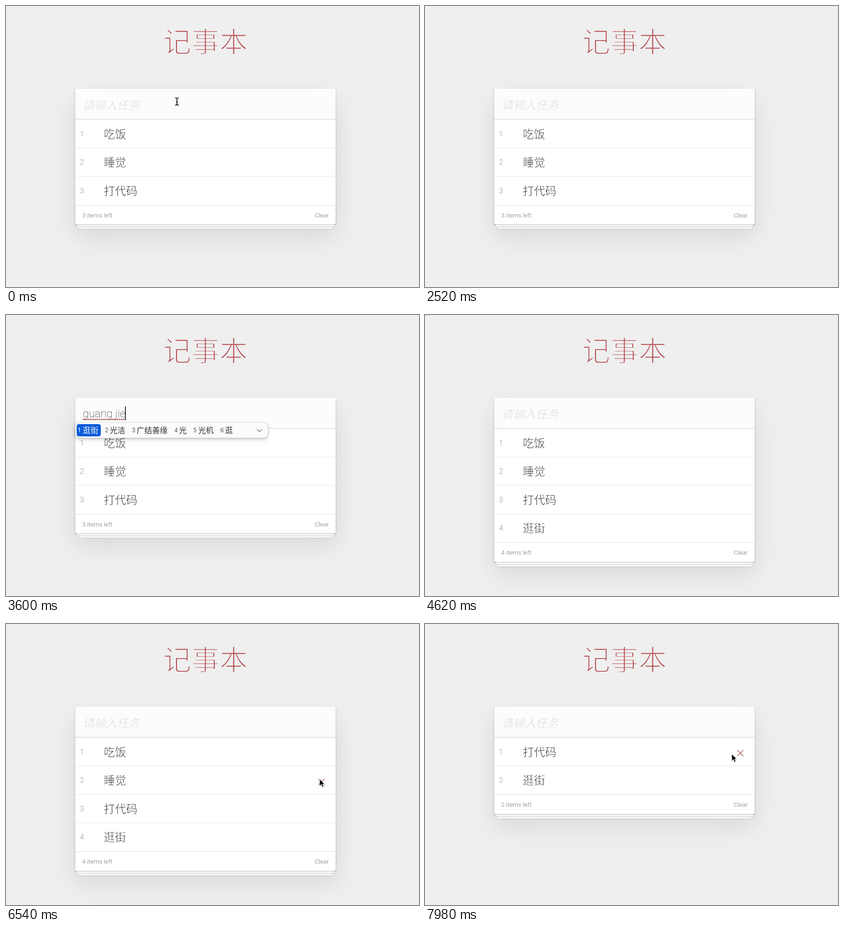
These frames come from a looping animation (906 px wide and 618 px high, 8000 ms). An HTML page:

```html
<!DOCTYPE html>
<html lang="zh-CN">
<head>
<meta charset="utf-8">
<style>
  html, body { margin: 0; width: 100%; height: 100%; overflow: hidden; background: #efefef; }
  body { position: relative; font-family: Roboto, "Noto Sans CJK SC", sans-serif; font-weight: 100; color: #444; }
  body * { position: absolute; box-sizing: border-box; white-space: nowrap; }
  .cjk { font-family: "Noto Sans CJK SC", "Noto Sans CJK", sans-serif; }
  /* An outline in the background colour thins the glyphs. */
  h1 { margin: 0; left: 0; width: 875px; top: 29.5px; line-height: 90px; text-align: center; font-size: 62px; font-weight: 100;
    color: #b5484c; -webkit-text-stroke: 2.7px #efefef; }
  #card { left: 152px; top: 182px; width: 571px; background: #fff;
    box-shadow: 0 2px 4px rgba(0,0,0,.2), 0 26px 52px rgba(0,0,0,.1); }
  #entry { left: 0; top: 0; width: 571px; height: 68.4px; background: #fcfcfc;
    box-shadow: inset 0 -2px 1px rgba(0,0,0,.03); border-bottom: 1px solid #d8d8d8; }
  #hint { left: 16.5px; top: 13.5px; line-height: 40px; font-size: 24.9px; font-style: italic; color: #dcdcdc;
    -webkit-text-stroke: .6px #fcfcfc; }
  #typed { left: 16.5px; top: 15px; line-height: 40px; font-size: 24px; color: #222; white-space: pre; }
  #typed.cjk { top: 13.5px; color: #444; -webkit-text-stroke: .6px #fcfcfc; }
  #typed.pinyin { border-bottom: 1px solid #777; height: 33.5px; }
  #typed.pinyin::after { content: ""; position: absolute; left: 0; right: 0; bottom: 0; border-bottom: 2px dotted #e0403c; }
  #caret { top: 19px; width: 1.4px; height: 30px; background: #333; }
  #list { left: 0; top: 68.4px; }
  .row { left: 0; width: 571px; height: 62.4px; border-bottom: 1px solid #e8e8e8; }
  .row:last-child { border-bottom: 0; }
  .num { left: 10px; top: 11.5px; line-height: 40px; font-size: 16.5px; font-weight: 300; color: #999; }
  .label { left: 62.5px; top: 9.5px; line-height: 40px; font-size: 24.6px; -webkit-text-stroke: .6px #fff; }
  .row svg { left: 532px; top: 26px; }
  #foot { left: 0; width: 571px; height: 42.5px; background: #fff; border-top: 1px solid #dedede;
    font-size: 13.6px; font-weight: 300; line-height: 42px; color: #777;
    box-shadow: 0 1px 1px rgba(0,0,0,.2), 0 8.3px 0 -3.1px #f6f6f6, 0 9.3px 1px -3.1px rgba(0,0,0,.2),
      0 16.6px 0 -6.2px #f6f6f6, 0 17.6px 2px -6.2px rgba(0,0,0,.2); }
  #count { left: 15px; top: 0; }
  #clear { right: 15px; top: 0; }
  #ime { left: 152px; top: 237px; width: 422px; height: 33px; border-radius: 8px; background: #fbfbfb;
    box-shadow: 0 0 1px rgba(0,0,0,.5), 0 3px 9px rgba(0,0,0,.25); }
  .pick { top: 3px; height: 27px; line-height: 26px; border-radius: 5px; font-size: 17px; font-weight: 500; color: #333; }
  .pick b { left: 3px; top: 1px; font: 400 12.5px/26px Inter, sans-serif; color: #555; }
  .pick span { left: 13.4px; top: 0; }
  .pick.on { background: #0a5bd8; }
  .pick.on, .pick.on b { color: #fff; }
  #ime svg { left: 397px; top: 13px; }
  .pointer { left: 0; top: 0; overflow: visible; filter: drop-shadow(0 1px 1px rgba(0,0,0,.3)); }
</style>
</head>
<body>
<h1 class="cjk">记事本</h1>
<div id="card">
  <div id="entry">
    <div id="hint" class="cjk">请输入任务</div>
    <div id="typed"></div>
    <div id="caret"></div>
  </div>
  <div id="list"></div>
  <div id="foot"><span id="count"></span><span id="clear">Clear</span></div>
</div>
<div id="ime"></div>
<svg id="arrow" class="pointer" width="14" height="20"><path d="M0 0V15.2L3.6 11.9L6 17.6L8.8 16.4L6.4 10.9H11Z" fill="#000" stroke="#fff" stroke-width="1"/></svg>
<svg id="beam" class="pointer" width="14" height="20"><path d="M-4 -8Q-.6 -8 0 -6Q.6 -8 4 -8M-4 8Q-.6 8 0 6Q.6 8 4 8M0 -6V6M-2 1H2" fill="none" stroke="#111" stroke-width="1.5"/></svg>
<script>
const LOOP = 8000, STEP = 60, ROW = 62.4, LIST_TOP = 68.4;
const $ = id => document.getElementById(id);

const todos = [
  [0, '吃饭 睡觉 打代码'], [4620, '吃饭 睡觉 打代码 逛街'],
  [7320, '睡觉 打代码 逛街'], [7800, '打代码 逛街']
];
const typing = [
  [0, ''], [900, '1'], [960, '12'], [1020, '123'], [1200, '1234'],
  [1500, '123'], [1560, '12'], [1680, '1'], [1860, ''],
  [2700, 'g'], [2820, 'gu'], [2940, 'gua'], [3060, 'guan'], [3180, 'guang'],
  [3300, 'guang j'], [3420, 'guang ji'], [3540, 'guang jie'], [3900, '逛街'], [4620, '']
];
const picks = [
  [0, ''], [2760, '个 给 该 跟 高 过 更'], [2880, '古 故 股 顾 鼓 谷 骨'], [3000, '挂 瓜 刮 寡 呱 卦 褂'],
  [3120, '关 管 官 观 馆 惯 冠'], [3240, '光 广 逛 广告 光线 广场'],
  [3360, '逛街 光洁 广角 光 广 逛'], [3480, '光机 广基 光级 光 广 逛'],
  [3600, '逛街 光洁 广结善缘 光 光机 逛'], [3960, '']
];
const caretOn = [[480, 1860], [2100, 2520], [2700, 4380], [4680, 5160], [5640, 6120], [6660, 7140]];
const path = [
  [0, 375, 210], [300, 313, 217], [4980, 313, 217], [5400, 235, 500], [5520, 235, 503],
  [5700, 262, 439], [6540, 688, 341], [6660, 694, 332], [7140, 697, 281],
  [7560, 697, 281], [7620, 696, 280], [7800, 696, 280], [7980, 673, 286]
];

const at = (track, t) => track.filter(k => k[0] <= t).pop()[1];
const words = s => s ? s.split(' ') : [];

function pointerAt(t) {
  const i = path.findIndex(k => k[0] > t);
  if (i < 0) return path[path.length - 1].slice(1);
  if (i === 0) return path[0].slice(1);
  const [a, b] = [path[i - 1], path[i]];
  const u = (t - a[0]) / (b[0] - a[0]), e = u * u * (3 - 2 * u);
  return [a[1] + (b[1] - a[1]) * e, a[2] + (b[2] - a[2]) * e];
}

// Colour of the delete cross eases over 200 ms once the pointer is on it.
function crossColor(t) {
  let heat = 0;
  for (let d = 0; d < 200; d += 50) heat += pointerAt(t - d)[0] >= 671 ? .25 : 0;
  const mix = (a, b) => Math.round(a + (b - a) * heat);
  return `rgb(${mix(204, 175)},${mix(154, 91)},${mix(154, 94)})`;
}

function rowHtml(label, i, hovered, t) {
  const cross = hovered ? `<svg width="16" height="16"><path d="M1.5 1.5L14.5 14.5M14.5 1.5L1.5 14.5" stroke="${crossColor(t)}" stroke-width="1.5"/></svg>` : '';
  return `<div class="row" style="top:${i * ROW}px"><span class="num">${i + 1}</span><span class="label cjk">${label}</span>${cross}</div>`;
}

function imeHtml(list) {
  let x = 3;
  const items = list.map((word, i) => {
    const html = `<div class="pick cjk${i ? '' : ' on'}" style="left:${x}px;width:${19 + 17 * word.length}px"><b>${i + 1}</b><span>${word}</span></div>`;
    x += 25 + 17 * word.length;
    return html;
  });
  return items.join('') + '<svg width="14" height="9"><path d="M1.5 1.5L7 6.5L12.5 1.5" fill="none" stroke="#777" stroke-width="1.4"/></svg>';
}

function setHtml(el, html) {
  if (el.lastHtml !== html) el.innerHTML = el.lastHtml = html;
}

function draw(t) {
  const [x, y] = pointerAt(t), shown = t < 900 || t >= 5040;
  const items = words(at(todos, t)), text = at(typing, t), list = words(at(picks, t));

  const hover = shown ? Math.floor((y - 182 - LIST_TOP) / ROW) : -1;
  setHtml($('list'), items.map((s, i) => rowHtml(s, i, i === hover, t)).join(''));
  const footTop = LIST_TOP + items.length * ROW;
  $('foot').style.top = footTop + 'px';
  $('card').style.height = footTop + 42.5 + 'px';
  setHtml($('count'), items.length + ' items left');

  $('hint').hidden = text !== '';
  setHtml($('typed'), text);
  $('typed').className = /[a-z]/.test(text) ? 'pinyin' : /^\d*$/.test(text) ? '' : 'cjk';
  $('caret').style.left = 16.4 + $('typed').offsetWidth + 'px';
  $('caret').hidden = !caretOn.some(([a, b]) => t >= a && t < b);
  setHtml($('ime'), imeHtml(list));
  $('ime').hidden = !list.length;

  const inField = y < 250;
  for (const [id, on] of [['beam', inField], ['arrow', !inField]]) {
    $(id).style.display = shown && on ? 'block' : 'none';
    $(id).style.transform = `translate(${x}px,${y}px)`;
  }
}

const start = performance.now();
function tick() {
  const t = (performance.now() - start) % LOOP;
  draw(Math.floor(t / STEP) * STEP);
  requestAnimationFrame(tick);
}
tick();
</script>
</body>
</html>
```
